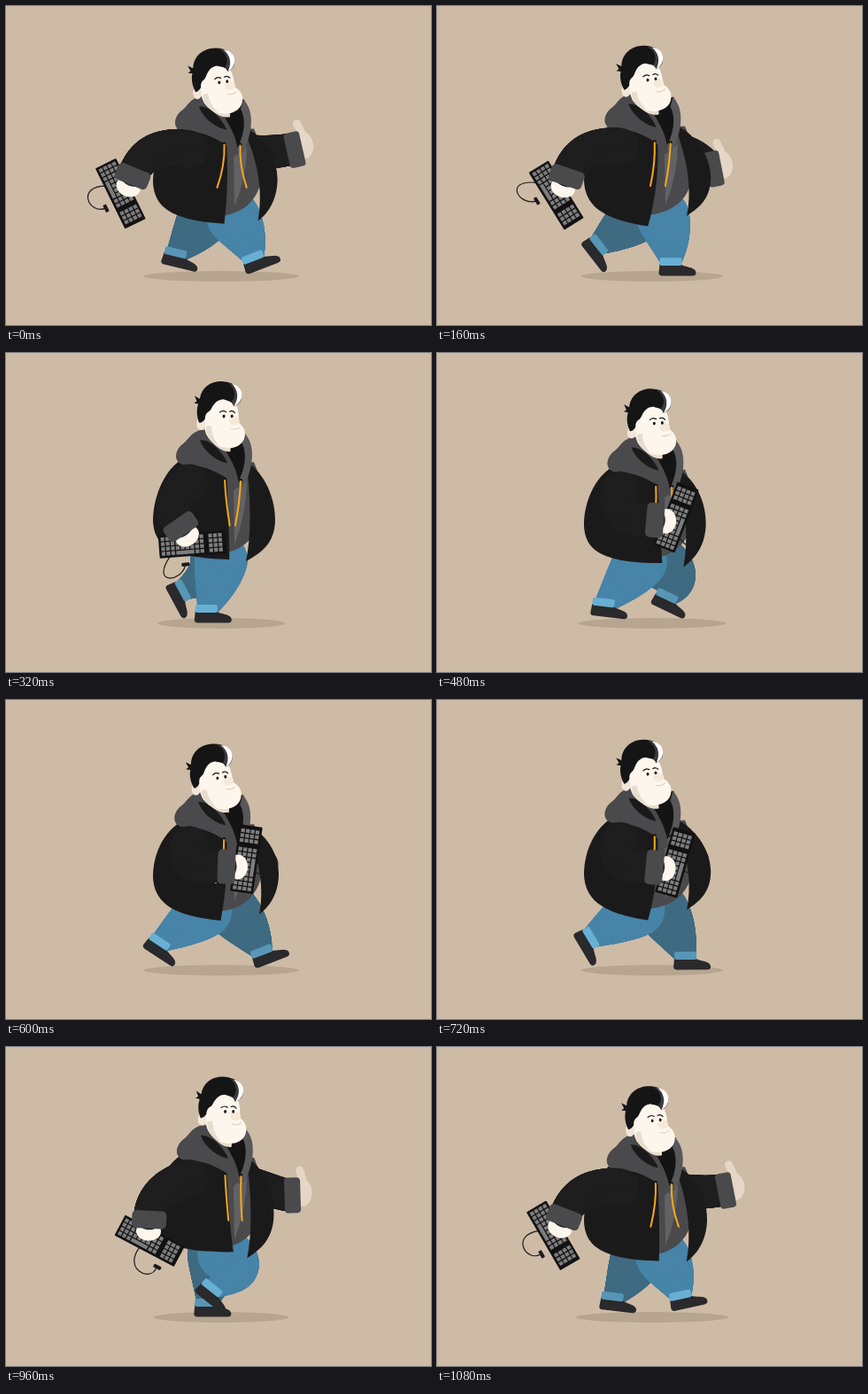
An HTML page with a canvas that plays this animation: 480 by 360 pixels, repeating every 1.12 s.

```html
<!DOCTYPE html>
<html lang="en">
<head>
<meta charset="utf-8">
<title>Walking with a keyboard</title>
<style>
  html, body { margin: 0; overflow: hidden; background: #cebba6; }
  canvas { display: block; }
</style>
</head>
<body>
<canvas id="stage" width="480" height="360"></canvas>
<script>
const ctx = document.getElementById('stage').getContext('2d');
const LOOP = 1120, STEP = 560, TICK = 40;
const JACKET = '#1b1a1b', SLEEVE = '#1f1e1f', GREY = '#4a494b', SKIN = '#fdf6ec';
const { PI, sin, cos, max } = Math, RAD = PI / 180;

// Cosine that reaches its peak at the given time
const wave = (t, period, peak, mean, amp) => mean + amp * cos((t - peak) / period * 2 * PI);
// Rises from 0 to 1 and back between two times
const hump = (t, from, to) => t > from && t < to ? sin((t - from) / (to - from) * PI) : 0;
const ease = u => (1 - cos(PI * u)) / 2;
// Arm swing from -1 to 1 that lingers at both ends
const swing = (t, peak) => sin(wave(t, LOOP, peak, 0, PI / 2));

function fill(color, path) {
  ctx.fillStyle = color;
  ctx.fill(new Path2D(path));
}

function line(color, width, path) {
  ctx.strokeStyle = color;
  ctx.lineWidth = width;
  ctx.stroke(new Path2D(path));
}

function oval(color, x, y, rx, ry = rx) {
  ctx.fillStyle = color;
  ctx.beginPath();
  ctx.ellipse(x, y, rx, ry, 0, 0, 7);
  ctx.fill();
}

function box(color, x, y, w, h, r) {
  ctx.fillStyle = color;
  ctx.beginPath();
  ctx.roundRect(x, y, w, h, r);
  ctx.fill();
}

function local(x, y, angle, draw) {
  ctx.save();
  ctx.translate(x, y);
  ctx.rotate(angle * RAD);
  draw();
  ctx.restore();
}

// Tapered limb along a quadratic curve
function limb(color, x0, y0, x1, y1, x2, y2, r0, r1) {
  for (let i = 0; i <= 60; i++) {
    const u = i / 60, v = 1 - u;
    oval(color, v * v * x0 + 2 * u * v * x1 + u * u * x2,
      v * v * y0 + 2 * u * v * y1 + u * u * y2, r0 + (r1 - r0) * u ** 1.4);
  }
}

// The leg strikes the ground at time 0 and pushes off around 650
function leg(t, shift, hipX, hipY, color, cuff) {
  t = (t + LOOP) % LOOP;
  const push = 650;
  const reach = t < push ? 1 - ease(t / push) : ease(((t - push) / (LOOP - push)) ** 1.5);
  const late = t < 140 ? t + LOOP : t;
  const lift = hump(late, 400, 1180);
  const x = 171 + 109 * reach + shift, y = 291 - 22 * lift;
  const angle = 64 * lift ** 2 - 25 * hump(late, 970, 1250) ** 2;
  const bend = 4 + 42 * hump(t, 780, 1080) ** 2;

  limb(color, hipX, hipY, (hipX + x) / 2 + bend, (hipY + y) / 2 - 2, x, y - 1, 30, 10.5);
  local(x, y, angle, () => {
    fill('#2a292b', 'M-13 0H10C14 4 28 3 28 10Q28 13.5 24 13.5H-10Q-14 13.5-14 10Z');
    box(cuff, -13, -7, 25, 9, 2);
  });
}

function farArm(t, dy) {
  const s = swing(t, -37);
  const x = 288 + 38 * s, y = 192 - 30 * max(0, s) ** 3;
  limb(SLEEVE, 263, 166 + dy, 292, 168 + dy / 2, x - 6, y, 20, 18);
  local(x, y, wave(t, LOOP, 62, 4, -18), () => {
    const hand = '#e5d6c6';
    oval(hand, 10, -3, 12, 16);
    line(hand, 9, 'M13-12L9-28');
    box(GREY, -9, -20, 18, 40, 4);
  });
}

function torso(t, dx, d) {
  const hemX = 241 + 3.2 * dx, hemY = wave(t, STEP, 96, 241, 10);
  const tipX = 286 + .9 * d, tipY = wave(t, STEP, 545, 238.5, 4);
  const side = wave(t, STEP, 125, 306, 3.5);
  const mid = 199 + d * .6, low = 243 + d * .7;

  fill(GREY, `M232 ${140 + d}H280C298 ${180 + d} 296 ${low - 5} 232 ${low - 4}Z`);
  fill('#626163', `M257 ${172 + d}L272 ${160 + d}Q272 ${195 + d} 258 ${227 + d * .6}Z`);
  fill(JACKET, `M268 ${138 + d}C288 ${146 + d} ${side} ${168 + d * .5} ${side} ${196 + d * .5}
    C${side} 220 ${tipX + 10} ${tipY - 7} ${tipX} ${tipY}Q${tipX + 8} 198 273 ${152 + d}Z`);
  fill(JACKET, `M208 ${132 + d}C180 ${142 + d} 166 ${172 + d * .6} 166 ${mid}
    C167 ${mid + 27} 183 ${low} ${hemX} ${hemY}Q252 200 249 ${150 + d}Z`);
}

function hood() {
  fill('#151415', 'M228 108L268 107L272 140L262 164Z');
  fill('#58575a', 'M267 107C280 120 278 145 266 168L257 168C268 150 271 130 264 118Z');
  fill(GREY, `M216 104C205 108 204 115 198 119C187 127 187 142 200 143
    C216 142 232 149 244 156L261 170C262 150 246 124 228 103Z`);
  fill(JACKET, 'M217 115C228 114 242 127 248 141C235 139 221 127 217 115Z');
}

function strings(t, x, d) {
  const left = 237 - 1.1 * d, right = wave(t, STEP, 513, 264, 9), y = 206 + .8 * d;
  oval('#111', 246 + x, 157 + d, 2);
  oval('#111', 264 + x, 158 + d, 2);
  line('#f6a81c', 2, `M${246 + x} ${158 + d}Q${247 + x} ${180 + d} ${left} ${y}`);
  line('#f6a81c', 2, `M${264 + x} ${159 + d}Q${263 + x} ${182 + d} ${right} ${y}`);
}

function head() {
  fill('#e8dccd', 'M219 95L222 110Q238 130 251 127L250 100Z');
  fill(SKIN, `M218 78C217 95 219 108 225 114C235 127 260 127 265 112
    C268 102 262 97 257 93C257 82 254 74 250 70L225 68Z`);
  fill('#e8dccd', 'M221 101C221 112 228 119 238 122C230 114 228 108 227 100Z');
  oval('#f1e6d8', 215, 99, 5, 7);
  oval('#f6e9da', 252, 92, 6, 5);
  fill('#161516', `M213 98C208 88 209 80 210 77L205 76L208 74L205 68L211 71
    C212 57 223 49 236 49C249 49 259 56 258 65C258 71 254 74 250 76
    C248 70 244 71 238 69C231 70 228 74 225 81C223 86 219 84 219 93Q217 97 213 98Z`);
  fill('#3b3a3c', 'M241 50C250 55 252 64 247 71L251 75C256 66 255 56 247 51Z');
  fill('#fff', 'M246 51C261 53 262 70 250 76C255 67 254 58 246 51Z');
  oval('#161516', 240, 88, 1.5, 1.8);
  oval('#161516', 249, 87, 1.5, 1.8);
  line('#161516', 1.2, 'M235 84Q238 81 242 83M246 82Q249 80 252 83');
  line('#dccbb8', 1, 'M249 101Q254 103 259 99');
}

function keyboard(sway) {
  const plug = 12 + sway * .8;
  line('#1c1b1c', 1.2, `M${sway / 2 - 12} 11C${sway - 24} 42 ${sway + 12} 42 ${plug} 23`);
  box('#1c1b1c', plug - 4, 20, 9, 4, 1);
  box('#131213', -38, -13, 76, 26, 1);
  for (let row = 0; row < 4; row++) {
    for (let col = 0; col < 13; col++) {
      const space = row === 3 && col === 3;
      if (col === 9 || (row === 3 && col > 3 && col < 7)) continue;
      const x = -35.5 + col * 5.5 - (col > 9 ? 1 : 0);
      ctx.fillStyle = '#7d7d7d';
      ctx.fillRect(x, -10.5 + row * 5.5, space ? 20.5 : 4.2, 4.3);
    }
  }
}

function nearArm(t, d) {
  const s = swing(t, 37);
  const x = 196 - 53 * s, y = 190 + 6 * (1 - s * s) + 2 * s;
  const angle = 57 + 55 * s, aim = angle * RAD;
  // the keyboard hangs from the hand and trails it a little
  const tilt = 37 * (s + wave(t, LOOP, 62, 0, 1)) - 8, hang = (tilt + 61) * RAD;

  local(x + 24 * cos(hang), y + 24 * sin(hang), tilt,
    () => keyboard(wave(t, LOOP, 840, -6, 22)));
  local(x, y, angle, () => oval(SKIN, 13, 0, 11, 14));
  limb(SLEEVE, 207, 163 + d, 179 - 17 * s, 172 - 19 * s,
    x - 6 * cos(aim), y - 6 * sin(aim), 21, 17.5);
  local(x, y, angle, () => box(GREY, -10, -19.5, 20, 39, 5));
}

function draw(t) {
  const dx = wave(t, STEP, 412, 2, 3), d = wave(t, STEP, 62, -8.3, 8.7);
  const stride = wave(t, LOOP, 62, 0, 16), hipY = 238 + d * .3;

  ctx.lineCap = 'round';
  ctx.fillStyle = '#cebba6';
  ctx.fillRect(0, 0, 480, 360);
  oval('#b7a58f', 243, 305, wave(t, STEP, 20, 80, 8), 6);

  farArm(t, d);
  oval('#4784a8', 241, hipY, 30 + Math.abs(stride) * .8, 22);
  leg(t - 600, 10, 240 - stride, hipY, '#3f6b82', '#5796b6');
  leg(t, 0, 241 + stride, hipY, '#4784a8', '#68afd4');
  torso(t, dx, d);
  local(dx * .6, d, 0, hood);
  strings(t, dx * .3, d * .85);
  local(240 + dx, 115 + d, wave(t, STEP, 366, 1, 5), () => {
    ctx.translate(-240, -115);
    head();
  });
  nearArm(t, d);
}

function frame() {
  draw(Math.floor(performance.now() % LOOP / TICK) * TICK);
  requestAnimationFrame(frame);
}
frame();
</script>
</body>
</html>
```
